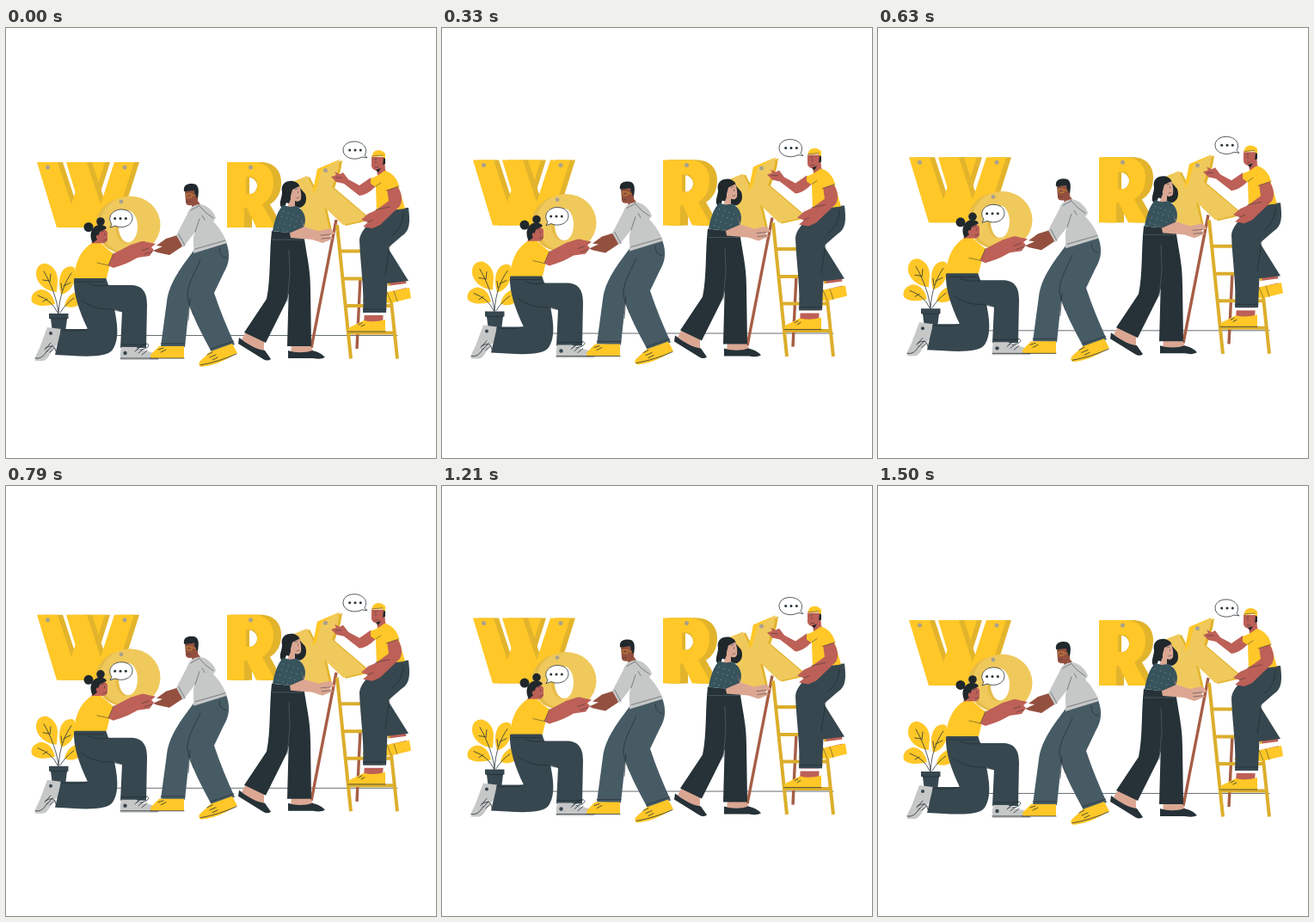
Recreate the animation shown at these times as an HTML page. Size 500 by 500 pixels, loop 1540 ms.

```html
<!DOCTYPE html>
<html lang="en">
<head>
<meta charset="utf-8">
<title>Work</title>
<style>
html, body { margin: 0; width: 100%; height: 100%; overflow: hidden; background: #fff; }
svg { display: block; width: 100vw; height: 100vh; }
.gold { fill: #ffc727; }
.shade { fill: #e2b42c; }
.pale { fill: #f0c95c; }
.slate { fill: #37474f; }
.denim { fill: #475b65; }
.ink { fill: #263238; }
.hair { fill: #20282c; }
.skin { fill: #bd6057; }
.brown { fill: #94503f; }
.tan { fill: #dba793; }
.grey { fill: #c6c7c7; }
.peg { fill: #aaa18d; }
.line { fill: none; stroke: #263238; stroke-width: .8; stroke-linecap: round; stroke-linejoin: round; }
.thin { stroke-width: .5; }
.seam { stroke: #1d282d; stroke-width: .6; }
.bubble { fill: #fff; stroke: #263238; stroke-width: .8; }
.rail { fill: none; stroke: #dcae2c; stroke-width: 4; }
.pole { fill: none; stroke: #a65e45; stroke-width: 3.4; }
</style>
</head>
<body>
<svg viewBox="0 0 500 500">
<defs>
  <path id="vee" d="M36 156H60L76 205L92 156H115L91 232H59Z"/>
  <path id="arr" fill-rule="evenodd" d="M257 156H287C303 156 311 166 311 180C311 192 306 200 298 205L313 232H291L280 209H277V232H257ZM279 173V193H285C295 193 295 173 285 173Z"/>
  <path id="kay" d="M335 178L350 172L358 188L362 164L388 153L386 165L379 185L420 220L418 223L392 229L370 208L377 239L350 243Z"/>
  <g id="dots" class="ink"><circle cx="-6.3" r="1.5"/><circle r="1.5"/><circle cx="6.3" r="1.5"/></g>
</defs>
<g id="scene">
  <path class="line" style="stroke-width:.7" d="M128 357.500H455"/>

  <!-- hanging letters -->
  <use href="#vee" x="6" class="shade"/><use href="#vee" class="gold"/>
  <use href="#vee" x="40" class="shade"/><use href="#vee" x="34" class="gold"/>
  <use href="#arr" x="9" class="shade"/><use href="#arr" x="5" class="shade"/>
  <path class="shade" d="M279 172H293V194H279Z"/>
  <path fill="#fff" d="M283 174H285Q292 177 292 184Q291 191 285 193H283Z"/>
  <use href="#arr" class="gold"/>
  <g class="peg"><circle cx="48.500" cy="162" r="2.500"/><circle cx="138" cy="162" r="2.500"/><circle cx="284.500" cy="162" r="2.500"/></g>

  <!-- plant -->
  <g class="gold">
    <path d="M59 307C45 306 35 296 35 286C35 277 41 273 47 274C55 277 60 283 60 293Z"/>
    <path d="M64 310C60 296 62 284 69 279C75 276 80 277 80 281V292C78 302 72 308 64 310Z"/>
    <path d="M57 321C46 324 34 324 30 318C28 312 32 306 40 304C49 304 55 311 57 321Z"/>
    <path d="M68 323C70 314 76 308 82 307L86 321C81 325 74 326 68 323Z"/>
  </g>
  <path class="line" d="M61 333C61 320 52 296 44 283M61 332C62 312 68 296 76 285M60 331Q54 317 37 311M63 331Q70 320 79 314M50 294L43 293M51 295L52 286M65 305L64 297M67 300L75 296M48 315L43 318"/>
  <path class="slate" d="M50 332H72.500V338H71L69 354H54L52 338H50Z"/>
  <path class="line seam" d="M52 338H71"/>

  <!-- round letter -->
  <ellipse fill="#e6bc48" cx="140" cy="230" rx="36" ry="33"/>
  <ellipse class="pale" cx="144.500" cy="229" rx="35" ry="33.500"/>
  <ellipse fill="#e6bc48" cx="140" cy="231" rx="13" ry="19"/>
  <ellipse fill="#fff" cx="142" cy="231" rx="11" ry="18.500"/>
  <circle class="peg" cx="134" cy="202" r="2.400"/>

  <!-- kneeling woman -->
  <path class="grey" d="M48 348L64 350L60 368C52 374 50 386 43 387H34C33 382 36 379 39 372Z"/>
  <path class="line" d="M45 374L52 366M48 376L54 369M51 377L57 372M34 384Q42 386 48 375M46 372Q57 366 58 376"/>
  <circle class="slate" cx="52" cy="355" r="2"/>
  <path class="slate" d="M79 291C78 309 85 329 95 350L64 350L57 380C90 382 117 384 124 374C132 362 130 344 125 322Z"/>
  <path class="slate" d="M80 290L116 290L119 299H144C159 299 164 307 164 322L163 372H133L135 330L121 326C97 326 80 316 80 290Z"/>
  <path class="line seam" d="M88 317Q103 328 121 327L135 330M64 351Q82 354 95 350M134 368H163M96 297Q108 302 119 299M82 295L114 295"/>
  <path class="grey" d="M134 371H151C159 376 166 375 174 379Q178 382 177 386H133Q132 378 134 371Z"/>
  <path class="line" d="M133 384H177M150 376L156 371M154 378L160 373M158 380L164 375M152 374Q164 363 166 369Q164 374 156 374"/>
  <circle class="slate" cx="138.500" cy="378" r="2.200"/>
  <path class="skin" d="M103 236L113 232L118 237V246Q117 251 111 250L109 257L99 252Z"/>
  <path class="gold" d="M97 252C102 249 106 251 110 250L124 262L117 291H79C80 276 85 261 97 252Z"/>
  <path class="skin" d="M122 264L145 252C153 250 158 246 164 249L174 251L169 255L172 258L167 265L153 267C143 273 134 276 125 279L118 276Z"/>
  <path class="gold" d="M109 253L125 262L119 276L106 272Z"/>
  <path class="line thin" d="M125 262L119 276L106 273M166 256L158 259M170 260L161 263"/>
  <g class="hair">
    <circle cx="96" cy="231.500" r="5.500"/><circle cx="110" cy="225" r="4.800"/>
    <path d="M101 250C95 239 101 229 109 229Q116 229 117 233L109 237L106 246Z"/>
  </g>
  <ellipse class="skin" cx="106.500" cy="243" rx="1.700" ry="2.600"/>
  <path class="line thin" d="M114.500 239V241M111 237L114 236M113 247L117 246"/>

  <!-- man holding the ring -->
  <path class="brown" d="M208 189H223V201L228 208L217 211L216 206Q210 207 209 203Z"/>
  <path class="hair" d="M207 190C206 183 210 181 216 181C224 181 225 187 223 198L220 195L219 189Z"/>
  <path class="line thin" d="M211 194V196M209 191L212 190M210 202L214 202"/>
  <path fill="none" stroke="#c38a35" stroke-width=".9" d="M210 193H216V197H211ZM216 194L221 195"/>
  <path class="denim" d="M218 259C205 277 190 295 187 318L180 370L208 371L214 314L242 270Z"/>
  <path class="denim" d="M218 258L256 249C261 263 260 273 253 285L242 308C249 329 257 348 266 368L239 377C228 356 216 335 211 313C209 298 221 278 226 268Z"/>
  <path class="line seam" d="M226 270C220 284 210 299 211 313Q213 324 218 334M238 373L265 364M180 367H208M248 256Q248 266 256 267M214 314L212 340"/>
  <path class="brown" d="M202 240L186 245L175 253L182 254L171 259L176 261L190 264L205 254Z"/>
  <path class="grey" d="M224 205C232 204 242 213 244 221L241 225C248 232 253 240 257 250L218 262C219 251 216 244 220 237L206 255L198 241L211 216C213 209 218 206 224 205Z"/>
  <path class="line thin" d="M220 237L225 222M224 206Q232 216 241 221M215 212Q218 210 224 207M201 240L208 253M220 257L255 247M228 218L231 223"/>
  <path class="gold" d="M178 370L207 370V384H169Q167 381 169 379Z"/>
  <path class="gold" d="M238 376L263 367L269 378C258 384 246 392 227 394Q222 391 226 387Z"/>
  <path class="line" d="M168 384H207M177 374L183 372M180 377L186 374M226 392Q248 388 268 379M234 380L240 377M237 383L244 380M240 386L246 383"/>

  <!-- leaning letter -->
  <use href="#kay" x="3" y="1" class="shade"/>
  <use href="#kay" class="pale"/>
  <path class="gold" d="M362 164L388 153L367 165L361 187L356 193Z"/>
  <circle class="peg" cx="371.500" cy="165.500" r="2.500"/>

  <!-- ladder -->
  <path class="pole" d="M384 223L355 372M412 290L408 373"/>
  <path class="rail" d="M385 229L401 384.500M440 243L455 384.500M388 259.500H440M391 291.500H444M394 323H448M397 354.500H451"/>

  <!-- standing woman -->
  <path class="tan" d="M279 353L300 364L300 375L287 373L274 362ZM332 366H352L359 379H331Z"/>
  <path class="ink" d="M271 360C280 367 291 374 301 375L308 385Q304 388 299 385L270 367Z"/>
  <path class="ink" d="M328 375C337 378 348 378 356 375Q366 377 371 383Q366 386 357 384H328Z"/>
  <path class="ink" d="M309 236L338 239C340 267 334 293 326 318L302 366L277 354L303 315C308 292 306 262 309 236Z"/>
  <path class="ink" d="M325 238L346 239C350 267 354 280 354 304L355 370H327L329 295Z"/>
  <path fill="none" stroke="#53636a" stroke-width=".7" d="M329 258L330 286L327 318M309 246H346"/>
  <path class="hair" d="M323 211C315 206 321 199 321 191C319 181 326 177 334 178Q341 180 342 186L348 193C351 202 347 208 341 209L326 203Z"/>
  <path class="tan" d="M330 188L341 183Q344 192 343 199Q341 203 336 201V211H326L331 199Z"/>
  <path class="hair" d="M322 207C324 199 322 187 328 181C334 178 341 180 341 184L333 188L330 199Z"/>
  <path class="line thin" d="M339.500 190V192M336 188L339 187M338 198L341 197"/>
  <path fill="#37535c" d="M322 206L330 208L337 207C346 211 350 220 347 229L346 240L310 236C312 225 315 214 322 206Z"/>
  <path class="tan" d="M327 223L343 222L347 231L363 236L377 233L383 239L376 241L380 245L368 250L356 246L331 244Z"/>
  <path fill="#37535c" d="M321 210C334 206 343 217 346 231L330 238L322 223Z"/>
  <path fill="none" stroke="#8ba0a6" stroke-width="1" stroke-dasharray="1 5" d="M322 213L340 219M320 219L342 226M318 226L338 232M316 232L328 236"/>
  <path class="line thin" d="M330 238L346 231M366 241L377 240M367 245L377 244"/>

  <!-- man on the ladder -->
  <path class="skin" d="M447 291L465 293L466 305L446 309ZM417 328H439L438 344H416Z"/>
  <path class="gold" d="M443 307L469 302L471 314L447 320L414 318L418 314L435 311Z"/>
  <path class="line thin" d="M443 307L448 319M451 306L455 318"/>
  <path fill="#fff" d="M443 300L466 297V302L444 307Z"/>
  <path class="slate" d="M438 246L468 294L443 297L436 266Z"/>
  <path class="slate" d="M430 211L468 209C470 225 470 236 460 242L445 255L442 331H415C417 306 412 275 411 247C412 234 425 228 430 211Z"/>
  <path class="line seam" d="M446 254L441 288M462 215Q462 232 448 242M415 327H442"/>
  <path fill="#fff" d="M415 331H442V334H415Z"/>
  <path class="gold" d="M416 340Q428 343 441 339V353.500H398Q397 348 404 346Z"/>
  <path class="line" d="M398 353H441M410 345L414 343M413 347L417 345"/>
  <path class="skin" d="M430 180L424 174L411 183L398 176L392 168L388 170L382 167L384 171L378 173L384 179L393 181L411 195Q420 194 429 185Z"/>
  <path class="skin" d="M425 150H440L441 165L444 169L433 175L431 166Q426 165 425 161Z"/>
  <path class="hair" d="M439 151H441V158L438 159ZM430 165L436 163L433 168Z"/>
  <path class="gold" d="M424 175Q433 172 440 166C450 168 455 176 457 186L464 210L431 214L430 185L424 181Z"/>
  <path class="skin" d="M443 187L455 184C460 191 462 200 458 207L435 229L426 233L415 231L421 226L413 223L421 216L430 212L445 201Z"/>
  <path class="gold" d="M440 169C449 168 455 175 457 184L442 189Z"/>
  <path class="line thin" d="M442 189L457 184M430 184L436 180M431 211L446 208M420 226L427 223M383 174L390 174"/>
  <path class="gold" d="M425 150L427 145C430 141 437 141 441 146V152L437 149Z"/>
  <path class="line thin" d="M426 149L438 148M430 155V157M428 153L431 152M429 162L433 162"/>

  <!-- speech bubbles -->
  <path class="bubble" d="M123 228C117 220 124 211 134 211C143 211 147 216 147 221C147 230 135 234 127 230L121 232Z"/>
  <use href="#dots" x="133" y="221.500"/>
  <path class="bubble" d="M417 148C422 139 414 132 405 132C396 132 392 137 392 142C392 151 405 155 414 150L420 151Z"/>
  <use href="#dots" x="406" y="142"/>
</g>
</svg>
<script>
const LOOP = 1540, STEPS = 37, LIFT = 6.2;
const scene = document.getElementById('scene');
const start = performance.now();

function draw(now) {
  const t = Math.max(0, now - start) % LOOP;
  const step = Math.floor((t + 4) / LOOP * STEPS) % STEPS;
  const y = -LIFT * (1 - Math.cos(2 * Math.PI * step / STEPS)) / 2;
  scene.setAttribute('transform', `translate(0 ${y.toFixed(2)})`);
  requestAnimationFrame(draw);
}
draw(start);
</script>
</body>
</html>
```
